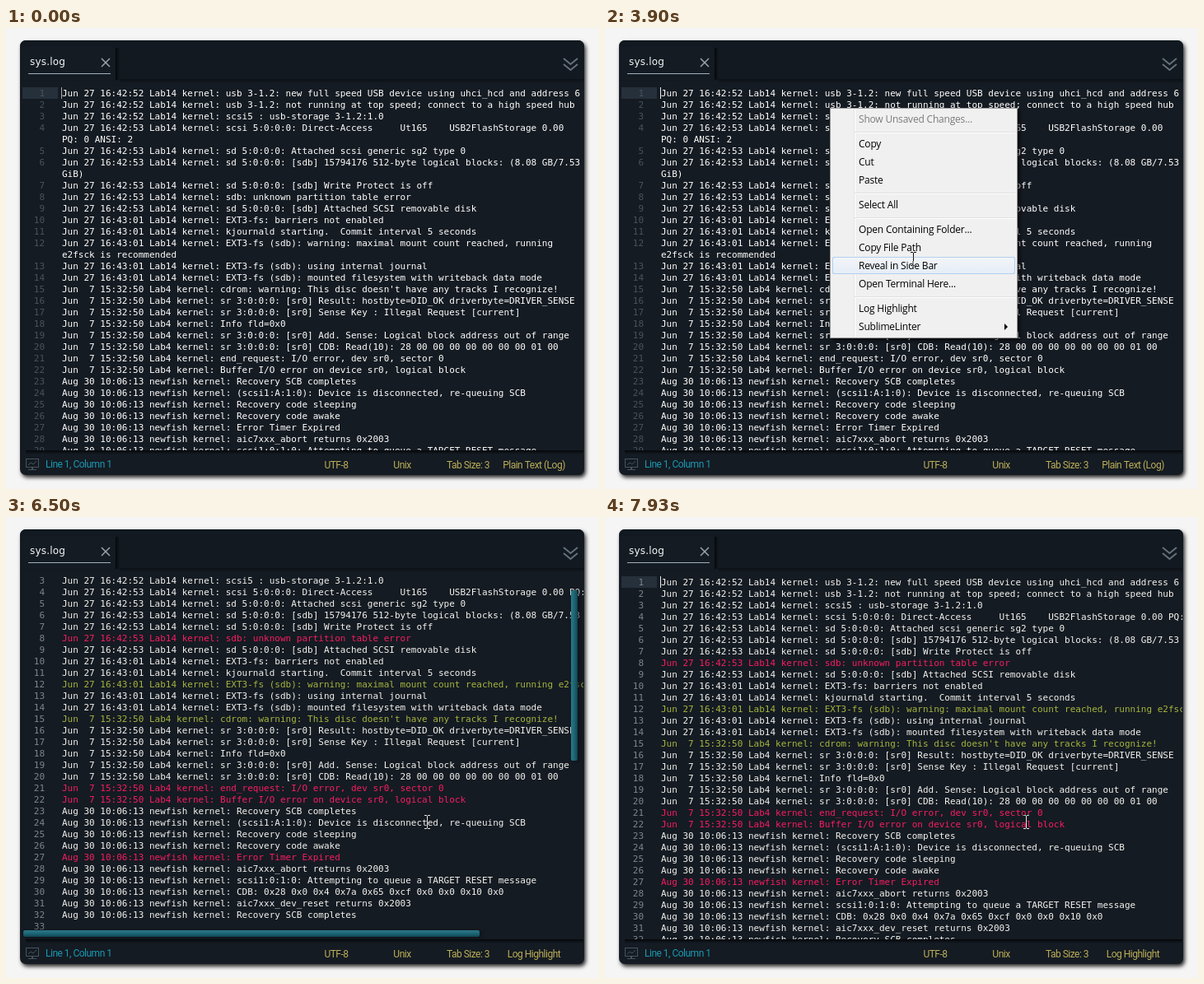
An HTML page with a canvas for the animation above (8 s loop, 720 px wide and 560 px high).

```html
<!DOCTYPE html>
<html lang="en">
<head>
<meta charset="utf-8">
<title>Log highlighting</title>
<style>
  html, body { margin: 0; width: 720px; height: 560px; overflow: hidden; background: #f5f5f5; }
  canvas { display: block; }
</style>
</head>
<body>
<canvas id="stage" width="720" height="560"></canvas>
<script>
const ctx = document.getElementById('stage').getContext('2d');
const LOOP = 8000, STEP = 130, ROW = 14;
const HIGHLIGHT_AT = 4680, MENU_OPEN = 2860, MENU_CLOSE = 4810;
const MONO = '11px "DejaVu Sans Mono", monospace';

const log = [
  ['Jun 27 16:42:52 Lab14',
    'usb 3-1.2: new full speed USB device using uhci_hcd and address 6',
    'usb 3-1.2: not running at top speed; connect to a high speed hub',
    'scsi5 : usb-storage 3-1.2:1.0'],
  ['Jun 27 16:42:53 Lab14',
    'scsi 5:0:0:0: Direct-Access     Ut165    USB2FlashStorage 0.00 PQ: 0 ANSI: 2',
    'sd 5:0:0:0: Attached scsi generic sg2 type 0',
    'sd 5:0:0:0: [sdb] 15794176 512-byte logical blocks: (8.08 GB/7.53 GiB)',
    'sd 5:0:0:0: [sdb] Write Protect is off',
    'sdb: unknown partition table error',
    'sd 5:0:0:0: [sdb] Attached SCSI removable disk'],
  ['Jun 27 16:43:01 Lab14',
    'EXT3-fs: barriers not enabled',
    'kjournald starting.  Commit interval 5 seconds',
    'EXT3-fs (sdb): warning: maximal mount count reached, running e2fsck is recommended',
    'EXT3-fs (sdb): using internal journal',
    'EXT3-fs (sdb): mounted filesystem with writeback data mode'],
  ['Jun  7 15:32:50 Lab4',
    "cdrom: warning: This disc doesn't have any tracks I recognize!",
    'sr 3:0:0:0: [sr0] Result: hostbyte=DID_OK driverbyte=DRIVER_SENSE',
    'sr 3:0:0:0: [sr0] Sense Key : Illegal Request [current]',
    'Info fld=0x0',
    'sr 3:0:0:0: [sr0] Add. Sense: Logical block address out of range',
    'sr 3:0:0:0: [sr0] CDB: Read(10): 28 00 00 00 00 00 00 00 01 00',
    'end_request: I/O error, dev sr0, sector 0',
    'Buffer I/O error on device sr0, logical block'],
  ['Aug 30 10:06:13 newfish',
    'Recovery SCB completes',
    '(scsi1:A:1:0): Device is disconnected, re-queuing SCB',
    'Recovery code sleeping',
    'Recovery code awake',
    'Error Timer Expired',
    'aic7xxx_abort returns 0x2003',
    'scsi1:0:1:0: Attempting to queue a TARGET RESET message',
    'CDB: 0x28 0x0 0x4 0x7a 0x65 0xcf 0x0 0x0 0x10 0x0',
    'aic7xxx_dev_reset returns 0x2003',
    'Recovery SCB completes']
];
const lines = log.flatMap(([stamp, ...rest]) => rest.map(s => `${stamp} kernel: ${s}`)).concat('');

const menu = [
  ['Show Unsaved Changes...', 111], ['Copy', 141], ['Cut', 163], ['Paste', 185],
  ['Select All', 215], ['Open Containing Folder...', 245], ['Copy File Path', 267],
  ['Reveal in Side Bar', 289], ['Open Terminal Here...', 311],
  ['Log Highlight', 341], ['SublimeLinter', 363]
];

// Keys are [time, value, ...]; values between them are linear.
const pointerPath = [[390, 543, 72], [520, 543, 100], [780, 430, 127], [910, 379, 125],
  [1300, 340, 200], [1820, 383, 297], [2080, 454, 352], [2340, 400, 250],
  [2730, 274, 98], [3120, 274, 98], [3640, 350, 240], [4290, 411, 341],
  [4810, 411, 341], [5460, 490, 364], [5980, 511, 370]];
const scrollKeys = [[6110, 0], [6240, 8], [6500, 30], [6630, 42], [6760, 50], [7020, 72],
  [7150, 78], [7280, 56], [7410, 28], [7670, 0]];
const barKeys = [[6110, 0], [6370, 1], [7670, 1], [7930, 0]];

function at(keys, t) {
  const i = keys.findIndex(k => k[0] > t);
  if (i < 0) return keys[keys.length - 1].slice(1);
  if (i === 0) return keys[0].slice(1);
  const a = keys[i - 1], b = keys[i], p = (t - a[0]) / (b[0] - a[0]);
  return a.slice(1).map((v, j) => v + (b[j + 1] - v) * p);
}

function rect(x, y, w, h, fill) {
  ctx.fillStyle = fill;
  ctx.fillRect(x, y, w, h);
}

function text(s, x, y, color, font, align = 'left', spacing = 0) {
  ctx.font = font;
  ctx.textAlign = align;
  ctx.letterSpacing = spacing + 'px';
  ctx.fillStyle = color;
  ctx.fillText(s, x, y);
}

function path(points, color, width = 1, close = false) {
  ctx.beginPath();
  points.forEach(([x, y]) => ctx.lineTo(x, y));
  if (close) ctx.closePath();
  ctx.strokeStyle = color;
  ctx.lineWidth = width;
  ctx.stroke();
}

function gradient(x0, y0, x1, y1, ...colors) {
  const g = ctx.createLinearGradient(x0, y0, x1, y1);
  colors.forEach((c, i) => g.addColorStop(i / (colors.length - 1), c));
  return g;
}

function rounded(x, y, w, h, r, fill) {
  ctx.beginPath();
  ctx.roundRect(x, y, w, h, r);
  ctx.fillStyle = fill;
  ctx.fill();
}

function shadow(color, blur, dx, dy) {
  Object.assign(ctx, { shadowColor: color, shadowBlur: blur, shadowOffsetX: dx, shadowOffsetY: dy });
}

function drawWindow() {
  rect(0, 0, 720, 560, '#f5f5f5');
  ctx.save();
  shadow('rgba(0,0,0,.85)', 5, 2, 3);
  rounded(17, 15, 685, 528, 7, '#151b22');
  ctx.restore();
  rounded(17, 15, 685, 49, [7, 7, 0, 0], '#121920');
  rect(17, 23, 116, 40, '#141b22');
  rect(133, 24, 5, 39, gradient(133, 0, 138, 0, '#05080b', '#121920'));
  rect(138, 62, 563, 5, gradient(0, 62, 0, 67, '#0b1015', '#151b22'));
  text('sys.log', 29, 45, '#f4f6f7', '12px "DejaVu Sans", sans-serif', 'left', .2);
  rect(27, 55, 100, 1, '#9fb0bb');
  path([[116, 37], [126, 47]], '#9aa5ad', 1.5);
  path([[126, 37], [116, 47]], '#9aa5ad', 1.5);
  for (const y of [37, 44]) path([[677, y], [685.5, y + 7], [694, y]], '#65717b', 2);
}

function drawText(t, scroll) {
  const styled = t >= HIGHLIGHT_AT;
  ctx.save();
  ctx.beginPath();
  ctx.rect(17, 70, 684, 443);
  ctx.clip();
  ctx.translate(0, -Math.round(scroll));
  rect(20, 72, 43, ROW, '#25303b');
  let y = 83;
  lines.forEach((line, i) => {
    text(i + 1, 47, y, styled ? '#7d868d' : '#48535d', MONO, 'right');
    const color = !styled ? '#fff' : /error/i.test(line) ? '#f51d63' : /warning/.test(line) ? '#a5b53f' : '#f3f3f0';
    const cut = !styled && line.length > 95 ? line.lastIndexOf(' ', 95) : line.length;
    const parts = [line.slice(0, cut), line.slice(cut + 1)];
    text(parts[0], 68, y, color, MONO);
    if (parts[1]) text(parts[1], 68, y += ROW, color, MONO);
    y += ROW;
  });
  const blink = .5 + 1.5 * Math.cos((t - 770) / 1000 * 2 * Math.PI);
  ctx.globalAlpha = Math.max(0, Math.min(1, blink));
  rect(67, 72, 1, ROW, '#e8eaec');
  ctx.restore();
}

function drawBars(t, scroll) {
  ctx.save();
  ctx.globalAlpha = at(barKeys, t)[0];
  shadow('rgba(10,15,20,.9)', 6, 2, 1);
  const y = 74.7 + scroll * .476;
  rounded(686, y, 8, 207, 2, gradient(686, 0, 694, 0, '#2a7888', '#1d6575', '#0f4552'));
  rounded(21, 502, 554, 8, 2, gradient(0, 502, 0, 510, '#2a7888', '#1d6575', '#0f4552'));
  ctx.restore();
}

function drawStatus(t) {
  rect(17, 513, 685, 23, '#141b22');
  rect(24, 513, 677, 5, gradient(0, 513, 0, 518, '#05080b', '#141b22'));
  ctx.strokeStyle = '#46535e';
  ctx.lineWidth = 1;
  ctx.strokeRect(24.5, 523.5, 15, 10);
  path([[27, 531], [30, 528], [33, 530], [37, 526]], '#46535e');
  path([[32, 534], [32, 536.5]], '#46535e', 2);
  path([[27, 536.5], [37, 536.5]], '#46535e');
  const font = '12px Roboto, sans-serif';
  text('Line 1, Column 1', 48, 534, '#1b98b4', font, 'left', -.5);
  const syntax = t >= HIGHLIGHT_AT ? 'Log Highlight' : 'Plain Text (Log)';
  ['UTF-8', 'Unix', 'Tab Size: 3', syntax].forEach((s, i) =>
    text(s, 401 + i * 80, 535, '#bdae58', font, 'center', -.5));
}

function drawMenu(pointerY) {
  ctx.save();
  shadow('rgba(0,0,0,.6)', 4, 3, 3);
  rect(273, 97, 228, 280, '#979797');
  ctx.restore();
  rect(274, 98, 226, 278, '#f0f0f0');
  rect(302, 99, 1, 276, '#e2e3e3');
  rect(303, 99, 1, 276, '#fff');
  for (const y of [126, 200, 230, 326]) {
    rect(303, y, 195, 1, '#e0e0e0');
    rect(303, y + 1, 195, 1, '#fff');
  }
  menu.forEach(([label, y], i) => {
    if (i && Math.abs(pointerY - y) < 11) {
      rounded(276, y - 11, 222, 21, 2, '#b3d0ee');
      rounded(277, y - 10, 220, 19, 2, gradient(0, y - 10, 0, y + 9, '#f2f5f9', '#e5edf6'));
    }
    text(label, 308, y + 4, i ? '#000' : '#7b7b7b', '12px "Open Sans", sans-serif', 'left', -.2);
  });
  ctx.beginPath();
  [[485, 359], [489, 363], [485, 367]].forEach(([x, y]) => ctx.lineTo(x, y));
  ctx.fillStyle = '#000';
  ctx.fill();
}

function drawArrow(x, y) {
  ctx.save();
  ctx.translate(x + .5, y + .5);
  path([[0, 0], [0, 16], [4, 12.5], [6.5, 18.5], [9, 17.5], [6.5, 11.5], [11, 11.5]], '#000', 1, true);
  ctx.fillStyle = '#fff';
  ctx.fill();
  ctx.restore();
}

// The beam inverts what lies under it.
function drawBeam(x, y) {
  ctx.save();
  ctx.globalCompositeOperation = 'difference';
  rect(x, y - 7, 1, 15, '#fff');
  for (const dy of [-8, 8]) {
    rect(x - 3, y + dy, 3, 1, '#fff');
    rect(x + 1, y + dy, 3, 1, '#fff');
  }
  ctx.restore();
}

function draw(now) {
  const t = Math.floor(now % LOOP / STEP) * STEP;
  const [x, y] = at(pointerPath, t).map(Math.round);
  const [scroll] = at(scrollKeys, t);
  const menuOpen = t >= MENU_OPEN && t < MENU_CLOSE;
  drawWindow();
  drawText(t, scroll);
  drawBars(t, scroll);
  drawStatus(t);
  if (menuOpen) drawMenu(y);
  if (menuOpen && t < 3380) drawArrow(x, y);
  else if (t >= pointerPath[0][0]) drawBeam(x, y);
}

const start = performance.now();
(function tick() {
  draw(performance.now() - start);
  requestAnimationFrame(tick);
})();
</script>
</body>
</html>
```
